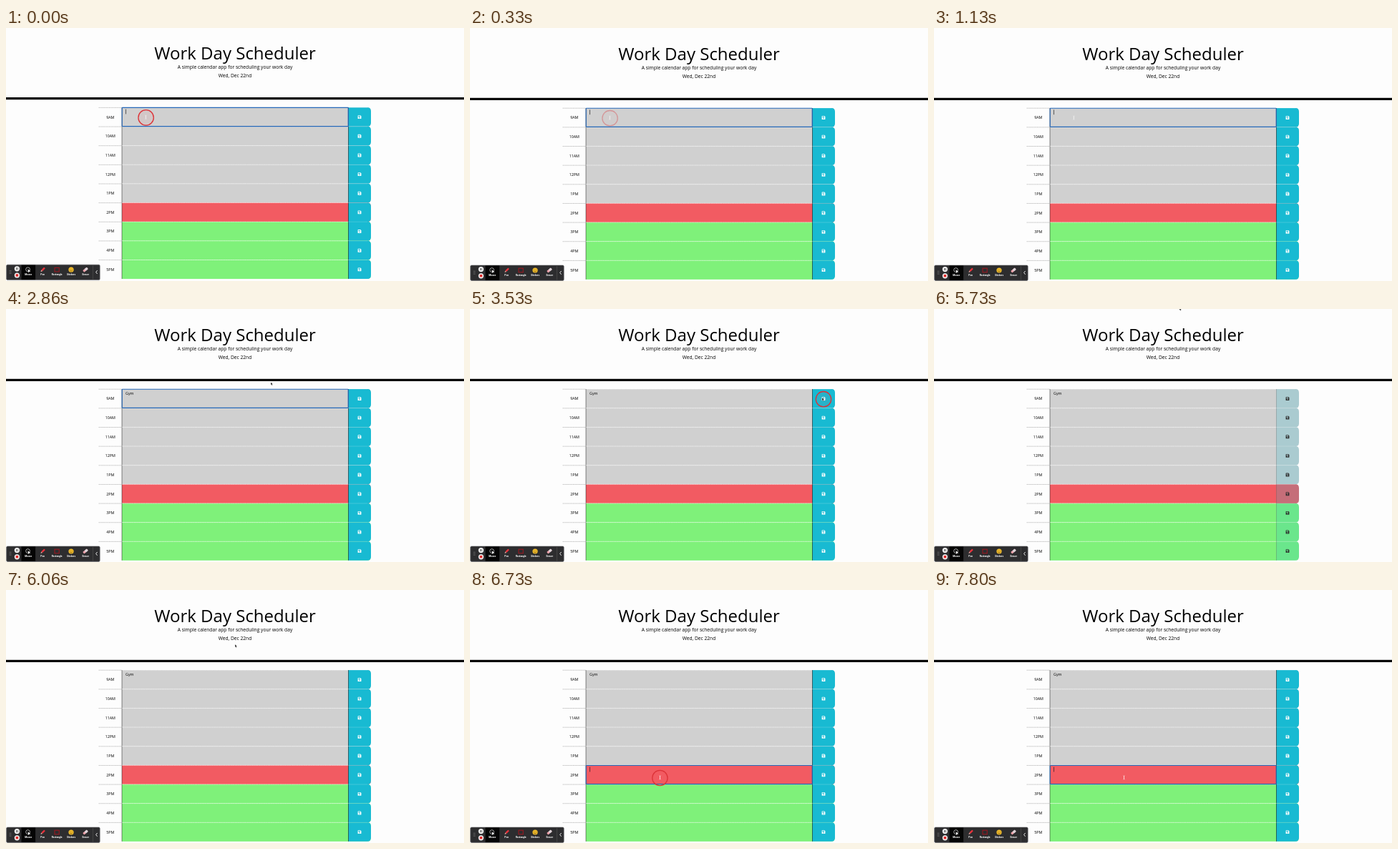
These frames come from a looping animation (640 px wide and 354 px high, 8 s). An HTML page:

```html
<!DOCTYPE html>
<html lang="en">
<head>
<meta charset="utf-8">
<title>Work Day Scheduler</title>
<style>
  html, body { margin: 0; width: 100%; height: 100%; overflow: hidden; background: #fdfdfd; }
  svg { display: block; width: 640px; height: 354px; }
  text { font-family: "Open Sans", sans-serif; fill: #000; }
  .mid { text-anchor: middle; }
  .tool { font: 700 3.3px Roboto, sans-serif; fill: #fff; text-anchor: middle; }
</style>
</head>
<body>
<svg id="stage" viewBox="0 0 640 354">
  <rect width="640" height="354" fill="#fdfdfd"/>
  <g id="page">
    <text class="mid" x="320" y="45.2" font-size="24">Work Day Scheduler</text>
    <text class="mid" x="320" y="58.2" font-size="6.67">A simple calendar app for scheduling your work day</text>
    <text class="mid" x="320" y="70.2" font-size="6.67">Wed, Dec 22nd</text>
    <rect y="97.8" width="640" height="3.2"/>
    <g id="rows"></g>
    <text id="note" x="167" y="120.4" font-size="5.33"></text>
    <rect id="focus" x="162.2" width="316" height="26.2" fill="none" stroke="#2467b8" stroke-width="1.1" rx=".6"/>
    <rect id="caret" width=".7" height="6.8" fill="#222"/>
    <g id="bar">
      <rect x=".6" y="332" width="130.6" height="21.4" rx="1.6" fill="#2d2d2f" stroke="#6a6a6c" stroke-width=".6"/>
      <g id="grip" fill="#9a9a9a"></g>
      <circle cx="15.4" cy="337.6" r="3.6" fill="#f4f4f4"/>
      <path d="M14.5 336v3.2M16.3 336v3.2" stroke="#333" stroke-width=".8"/>
      <circle cx="15.4" cy="346.8" r="3.6" fill="#f4f4f4"/>
      <rect x="13.6" y="345" width="3.6" height="3.6" rx=".6" fill="#e02b2b"/>
      <rect x="21.5" y="332.5" width="19.6" height="20.4" fill="#050505"/>
      <circle cx="30.6" cy="338.6" r="2.9" fill="none" stroke="#e8e8e8" stroke-width=".7"/>
      <path d="M30.4 338l4 3.4-2 .2-1 1.6z" fill="#fff"/>
      <g transform="translate(51.4 339) rotate(45)">
        <rect x="-1.2" y="-3.8" width="2.4" height="5.4" rx=".6" fill="#e8323c"/>
        <path d="M-1.2 1.8h2.4l-1.2 2.4z" fill="#f3b0a8"/>
      </g>
      <rect x="68" y="336.2" width="6.2" height="5.6" fill="none" stroke="#a3161f" stroke-width="1"/>
      <circle cx="91" cy="339" r="3.6" fill="#f2bd2c"/>
      <path d="M89.7 337.6v.9M92.3 337.6v.9M89 339.9q2 2.4 4 0" fill="none" stroke="#5c4108" stroke-width=".6"/>
      <g transform="translate(111 339) rotate(-40)">
        <rect x="-3.6" y="-1.6" width="7.2" height="3.2" rx=".8" fill="#f0a3ac"/>
        <rect x="-.6" y="-1.6" width="4.2" height="3.2" rx=".8" fill="#d9d3d8"/>
      </g>
      <g id="tools"></g>
      <path d="M121.4 333v19.6" stroke="#555" stroke-width=".6"/>
      <path d="M127.6 340l-2 2.4 2 2.4" fill="none" stroke="#fff" stroke-width=".9"/>
    </g>
    <circle id="ring" r="10.7" fill="#ff5a5a" fill-opacity=".07" stroke="#dc3338" stroke-width="1.3"/>
    <path id="beam" d="M-1 -2.6q1 0 1 .8v3.6q0 .8 1 .8M1 -2.6q-1 0-1 .8v3.6q0 .8-1 .8" fill="none" stroke-width=".7"/>
    <path id="arrow" d="M0 0v3.9l.9-.8.7 1.5.7-.3-.7-1.5h1.2z" fill="#111" stroke="#fff" stroke-width=".25"/>
  </g>
</svg>
<script>
const NS = "http://www.w3.org/2000/svg";
const $ = id => document.getElementById(id);
const LOOP = 8000, FPS = 15;
const TOP = 112, PITCH = 26.65;
const GREY = "#d0d0d0", RED = "#f25b62", GREEN = "#7ff17a", TEAL = "#18bad2";

function set(el, attrs) {
  for (const k in attrs) el.setAttribute(k, attrs[k]);
  return el;
}
function add(parent, tag, attrs, text) {
  const el = set(document.createElementNS(NS, tag), attrs);
  if (text) el.textContent = text;
  parent.appendChild(el);
  return el;
}
const rowY = i => TOP + i * PITCH;

const fills = [], icons = [], edges = [];
["9AM", "10AM", "11AM", "12PM", "1PM", "2PM", "3PM", "4PM", "5PM"].forEach((hour, i) => {
  const g = add($("rows"), "g", { transform: `translate(0 ${rowY(i)})` });
  const color = i < 5 ? GREY : i === 5 ? RED : GREEN;
  const button = `M478.4 0H505q5 0 5 5V${PITCH - 5}q0 5-5 5H478.4z`;
  add(g, "text", { x: 145.8, y: 15.4, "font-size": 5.33, class: "mid" }, hour);
  add(g, "path", { d: "M129.6 .2H161.8", stroke: "#000", "stroke-width": .6, "stroke-dasharray": "1 .8", opacity: .5 });
  add(g, "rect", { x: 162, width: 316.6, height: PITCH, fill: color });
  add(g, "path", { d: button, fill: color });
  fills.push(add(g, "path", { d: button, fill: TEAL }));
  add(g, "path", { d: "M162 .1H478.4", stroke: "#fff", "stroke-width": .7, "stroke-dasharray": "1.3 .4", opacity: .8 });
  add(g, "path", { d: "M478.6 .1H505", stroke: "#fff", "stroke-width": .4, opacity: .45 });
  add(g, "path", { d: `M162 0V${PITCH}`, stroke: "#000", "stroke-width": .7, opacity: .65 });
  edges.push(add(g, "path", { d: `M478.5 0V${PITCH}`, stroke: "#000", "stroke-width": .8 }));
  // floppy disk with label slot and hub cut out
  icons.push(add(g, "path", {
    transform: "translate(491.6 11)",
    "fill-rule": "evenodd",
    d: "M.5 0H3.7L4.8 1.1V4.4q0 .5-.5 .5H.5Q0 4.9 0 4.4V.5Q0 0 .5 0zM.8 .8V2H3.4V.8zM1.6 3.4a.8 .8 0 1 0 1.6 0a.8 .8 0 1 0-1.6 0z"
  }));
});

for (let i = 0; i < 6; i++)
  add($("grip"), "rect", { x: 4.8 + (i % 2) * 1.7, y: 339.8 + (i >> 1) * 2, width: .8, height: .8 });
["Mouse", "Pen", "Rectangle", "Stickers", "Eraser"].forEach((name, i) =>
  add($("tools"), "text", { x: 31.2 + i * 20, y: 347.2, class: "tool" }, name));

const clamp = x => Math.max(0, Math.min(1, x));
const smooth = x => (x = clamp(x), x * x * (3 - 2 * x));
const within = (t, a, b) => t >= a && t < b;

// time, x, y
const path = [
  [0, 195.4, 125.6], [2590, 195.4, 125.6], [2867, 370.3, 102.4], [3070, 440, 92],
  [3370, 494, 126], [3480, 494, 126], [4267, 343, -2.2], [5800, 343, -2.2],
  [6540, 265.5, 262.4], [8000, 265.5, 262.4]
];
function pointer(t) {
  const i = Math.max(1, path.findIndex(p => p[0] > t));
  const [t0, x0, y0] = path[i - 1], [t1, x1, y1] = path[i];
  const u = (t - t0) / (t1 - t0);
  // ease out of and into rests, steady through the mid-move points
  const k = i === 2 ? u * (2 + u) / 3 : i === 3 || i === 4 ? u : smooth(u);
  return [x0 + (x1 - x0) * k, y0 + (y1 - y0) * k];
}

const clicks = [[-133, 195.6, 126.2], [3400, 494, 126.2], [6600, 265.4, 263]];
const reloads = [4690, 5690];
const keys = [[1600, "G"], [1860, "Gy"], [2060, "Gym"]];
const caretEnds = { "": 167, G: 171.1, Gy: 173.8, Gym: 178.8 };

function draw(time) {
  const t = Math.floor(time * FPS / 1000 + .15) * 1000 / FPS;
  $("page").setAttribute("transform", `translate(0 ${t < 50 ? -.8 : 0})`);

  const typed = keys.filter(k => t >= k[0]).pop();
  const note = typed ? typed[1] : "";
  $("note").textContent = note;

  const row = t < 3430 ? 0 : t >= 6590 ? 5 : -1;
  set($("focus"), { y: rowY(Math.max(0, row)) + .2, visibility: row < 0 ? "hidden" : "visible" });
  const blink = t < 600 || within(t, 1130, 2590) || within(t, 3130, 3430) ||
    within(t, 6590, 7190) || t >= 7730;
  set($("caret"), {
    x: row === 5 ? 167 : caretEnds[note],
    y: rowY(Math.max(0, row)) + 2.4,
    visibility: row >= 0 && blink ? "visible" : "hidden"
  });

  let load = 1;
  for (const r of reloads) if (within(t, r + 40, r + 150)) load = smooth((t - r) / 150);
  const shade = Math.round(35 + 220 * load * load);
  fills.forEach((f, i) => {
    f.setAttribute("opacity", load);
    icons[i].setAttribute("fill", `rgb(${shade},${shade},${shade})`);
    edges[i].setAttribute("opacity", .15 + .5 * load);
  });

  const click = clicks.filter(c => t >= c[0]).pop();
  const age = t - click[0];
  set($("ring"), {
    cx: click[1], cy: click[2],
    r: 5 + 5.7 * smooth((age + 40) / 150),
    opacity: 1 - clamp((age - 135) / 520)
  });

  const [x, y] = pointer(t);
  const shown = !within(t, 1590, 2590);
  const overText = x > 162 && x < 478 && y > TOP;
  const place = `translate(${x} ${y})`;
  set($("beam"), {
    transform: place,
    stroke: y > rowY(5) ? "#fbe3e3" : "#f0f0f0",
    visibility: shown && overText ? "visible" : "hidden"
  });
  set($("arrow"), { transform: place, visibility: shown && !overText ? "visible" : "hidden" });
}

function tick() {
  draw(performance.now() % LOOP);
  requestAnimationFrame(tick);
}
tick();
</script>
</body>
</html>
```
